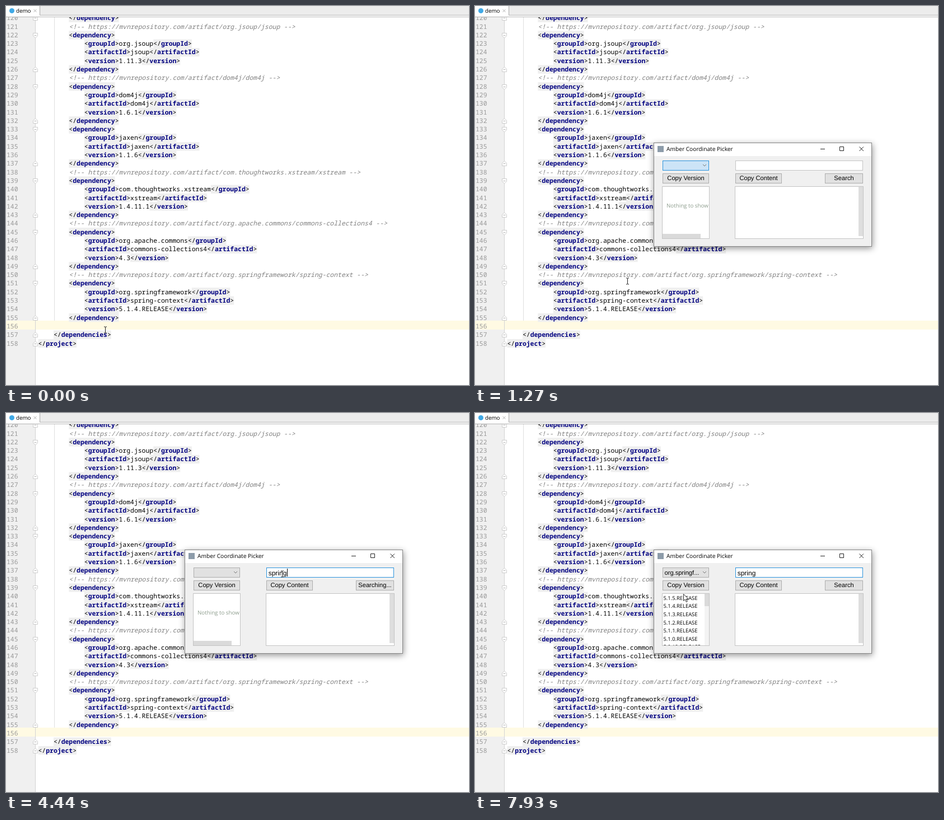
Animation, 827 px wide and 677 px high, one loop 8000 ms. Source, as an HTML page:

```html
<!DOCTYPE html>
<html lang="en">
<head>
<meta charset="utf-8">
<title>Dependency picker</title>
<style>
  html, body { margin: 0; width: 100%; height: 100%; overflow: hidden; background: #fff; }
  svg { display: block; width: 827px; height: 677px; }
  text { text-rendering: geometricPrecision; }
  .mono { font: 11.43px "Noto Sans Mono", "DejaVu Sans Mono", monospace; }
  .tag { font-weight: 700; fill: #000080; }
  .note { font-style: italic; fill: #808080; }
  .num { fill: #999; }
  .ui { font-family: "Open Sans", "Noto Sans", sans-serif; }
  .swing { font: 11.15px "Liberation Sans", Arial, sans-serif; }
  .shadow { filter: drop-shadow(1px 3px 6px rgba(0, 0, 0, .42)); }
  .line { fill: none; stroke: #222; }
</style>
</head>
<body>
<svg id="stage" viewBox="0 0 827 677"></svg>
<script>
const LOOP = 8000, TICK = 77;
const CHAR = 6.857, LEFT = 57.5, ROW = 15.295;

const esc = s => s.replace(/&/g, '&amp;').replace(/</g, '&lt;');
const text = (x, y, s, cls = '', more = '') => `<text x="${x}" y="${y}" class="${cls}" ${more}>${esc(s)}</text>`;
const rect = (x, y, w, h, fill, more = '') => `<rect x="${x}" y="${y}" width="${w}" height="${h}" fill="${fill}" ${more}/>`;
const box = (x, y, w, h, fill, stroke, id = '') =>
  rect(x + .5, y + .5, w - 1, h - 1, fill, `stroke="${stroke}" ${id && `id="${id}"`}`);
const path = (d, cls = 'line', more = '') => `<path d="${d}" class="${cls}" ${more}/>`;

// Editor
const repo = 'https://mvnrepository.com/artifact/';
const deps = [
  ['org.jsoup', 'jsoup', '1.11.3', true],
  ['dom4j', 'dom4j', '1.6.1', true],
  ['jaxen', 'jaxen', '1.1.6', false],
  ['com.thoughtworks.xstream', 'xstream', '1.4.11.1', true],
  ['org.apache.commons', 'commons-collections4', '4.3', true],
  ['org.springframework', 'spring-context', '5.1.4.RELEASE', true]
];

function sourceLines() {
  const lines = [[8, '</dependency>']];
  const leaf = (name, value) => lines.push([12, `<${name}>${value}</${name}>`]);
  for (const [group, artifact, version, noted] of deps) {
    if (noted) lines.push([8, `<!-- ${repo}${group}/${artifact} -->`]);
    lines.push([8, '<dependency>']);
    leaf('groupId', group);
    leaf('artifactId', artifact);
    leaf('version', version);
    lines.push([8, '</dependency>']);
  }
  return lines.concat([[0, ''], [4, '</dependencies>'], [0, '</project>']]);
}

function fold(y, closing) {
  const s = closing ? -1 : 1;
  const d = `M48.5 ${y - 4 * s}h8v${5 * s}l-4 ${3.5 * s}l-4 ${-3.5 * s}z`;
  return path(d, '', 'fill="#fff" stroke="#cdcdcd"') +
    path(`M50.5 ${y}h4`, '', 'stroke="#b4b4b4"');
}

function codeLine([indent, code], i) {
  const mid = 36.6 + (i - 1) * ROW, base = Math.round(mid + 4);
  let out = text(1, base, String(120 + i), 'mono num');
  if (code.startsWith('<!--'))
    return out + text(LEFT + indent * CHAR, base, code, 'mono note');
  let col = indent;
  for (const part of code.match(/<[^>]+>|[^<]+/g) || []) {
    const at = n => LEFT + n * CHAR;
    if (part[0] === '<') {
      const head = part[1] === '/' ? 2 : 1;
      out += rect(at(col), mid - 7.6, part.length * CHAR, ROW, '#efefef') +
        text(at(col), base, part.slice(0, head), 'mono') +
        text(at(col + head), base, part.slice(head, -1), 'mono tag') +
        text(at(col + part.length - 1), base, '>', 'mono');
    } else out += text(at(col), base, part, 'mono');
    col += part.length;
  }
  if (/^<\/?[a-z]+>$/.test(code)) out += fold(Math.round(mid) + .5, code[1] === '/');
  return out;
}

const editor = rect(0, 0, 827, 677, '#fff') +
  rect(0, 20, 52, 657, '#f0f0f0') +
  rect(0, 562, 827, 16, '#fffae3') +
  rect(52, 20, 1, 657, '#d4d4d4') +
  rect(86, 20, 1, 542, '#dedede') +
  sourceLines().map(codeLine).join('') +
  rect(113, 563, 1, 15, '#000', 'id="editCaret"') +
  rect(0, 0, 827, 20, '#fff') +
  rect(60, 0, 767, 17, '#ececec') +
  rect(60, 0, 1, 17, '#a8a8a8') + rect(60, 16, 767, 1, '#b4b4b4') +
  rect(0, 19, 827, 1, '#b4b4b4') +
  '<circle cx="10.5" cy="8.5" r="4.5" fill="#40a9e6"/>' +
  text(18, 12, 'demo', 'ui', 'font-size="9.8"') +
  path('M49.5 6l5 5m0-5l-5 5', '', 'stroke="#b0b0b0"');

// Dialog
const button = (x, w, label, id = '') => box(x, 299, w, 18, '#e1e1e1', '#adadad') +
  text(x + w / 2, 311, label, 'swing', `text-anchor="middle" ${id && `id="${id}"`}`);

const versions = ['5.1.5', '5.1.4', '5.1.3', '5.1.2', '5.1.1', '5.1.0', '5.0.13'];

const dialog = rect(319, 244, 390, 186, '#f0f0f0', 'class="shadow"') +
  box(319, 244, 390, 186, '#f0f0f0', '#858585') +
  rect(320, 245, 388, 23, '#fff') +
  rect(326, 250, 11, 11, '#8d9caa') +
  text(342, 259, 'Amber Coordinate Picker', 'ui', 'font-size="10.2"') +
  path('M617 255.5h8M651.5 251.5h7v7h-7zM686.5 251.5l7.5 7.5m0-7.5l-7.5 7.5') +
  box(335, 276, 83, 18, '#e1e1e1', '#adadad', 'combo') +
  path('M407 283l3 3l3-3', 'line', 'style="stroke:#777"') +
  text(338.5, 289, 'org.springf...', 'swing', 'id="group"') +
  box(465, 276, 228, 18, '#fff', '#c4c4c4', 'field') +
  text(468.7, 290, '', 'swing', 'id="typed" style="font-size:12px"') +
  rect(469, 278, 1, 14, '#000', 'id="caret"') +
  button(335, 83, 'Copy Version', 'copy') +
  button(465, 83, 'Copy Content') +
  button(625, 68, 'Search', 'search') +
  box(334, 322, 85, 94, '#fff', '#c4c4c4') +
  '<g id="empty">' + text(342, 360, 'Nothing to show', 'ui', 'font-size="9.75" fill="#8c9c8c"') +
  rect(335, 407, 68, 8, '#dadada') + '</g>' +
  '<clipPath id="clip"><rect x="335" y="323" width="83" height="92"/></clipPath>' +
  '<g id="list" clip-path="url(#clip)">' + rect(410, 323, 8, 92, '#f3f3f3') + rect(410, 323, 8, 22, '#dadada') +
  versions.map((v, i) => text(336.5, Math.round(333.7 + i * 14.6), v + '.RELEASE', 'ui', 'font-size="9.4"')).join('') + '</g>' +
  box(464, 322, 230, 94, '#fff', '#c4c4c4') +
  rect(685, 323, 8, 88, '#dedede');

const pointers =
  path('M-2.5-5.5h2l.5 .5l.5-.5h2M0-5v10M-2.5 5.5h2l.5-.5l.5 .5h2', 'line', 'id="beam"') +
  path('M0 0v12l2.8-2.6l2 4.8l2-.9l-2-4.6h3.8z', '', 'id="arrow" fill="#fff" stroke="#222" stroke-width=".9"');

const stage = document.getElementById('stage');
stage.innerHTML = editor + `<g id="dialog">${dialog}</g>` + pointers;
const el = id => document.getElementById(id);
const show = (id, on) => el(id).setAttribute('visibility', on ? 'inherit' : 'hidden');
const set = (id, attrs) => { for (const k in attrs) el(id).setAttribute(k, attrs[k]); };

// Tables of steps: [start, value, ...]
const opening = [[0, 0, .92], [500, .3, .96], [570, .75, .985], [650, .93, .995], [730, 1, 1]];
const typing = [[0, '', 469], [2890, 's', 475], [2980, 'sp', 482], [3120, 'spr', 486],
  [3200, 'spri', 489], [3350, 'sprin', 496], [3430, 'spring', 502]];
const blinks = [1880, 2340, 2890, 3890, 4440, 4910, 5460, 5920, 6150, 6530, 7000, 7470];
const moves = [
  [1040, 11, 494, 287],
  [6380, 3, 517, 288],
  [6700, 5, 530, 288],
  [7470, 7, 373, 323]
];

const latest = (table, t) => table.filter(row => row[0] <= t).pop();

const easeBoth = p => p * p * (3 - 2 * p);
const easeOut = p => 1 - (1 - p) ** 2;

function pointer(t) {
  let x = 178, y = 578;
  for (const [start, steps, toX, toY] of moves) {
    if (t < start) break;
    const p = Math.min(1, (Math.floor((t - start) / TICK + .06) + 1) / steps);
    const e = (toX < x ? easeOut : easeBoth)(p);
    x += (toX - x) * e;
    y += (toY - y) * e;
  }
  return [x, y];
}

function draw(t) {
  const [, alpha, size] = latest(opening, t);
  set('dialog', {
    opacity: alpha,
    transform: `translate(514 337) scale(${size}) translate(-514 -337)`
  });
  show('editCaret', t >= 420 && t < 500);

  const focus = t >= 1880, found = t >= 6150;
  set('combo', { fill: focus ? '#e1e1e1' : '#cce4f7', stroke: focus ? '#adadad' : '#2b93dc' });
  set('field', { stroke: focus ? '#2b93dc' : '#c4c4c4' });

  const [, word, caretX] = latest(typing, t);
  el('typed').textContent = word;
  set('caret', { x: caretX });
  show('caret', blinks.filter(b => b <= t).length % 2 === 1);

  el('search').textContent = t >= 4270 && !found ? 'Searching...' : 'Search';
  el('copy').textContent = found && t < 7320 ? 'Searching...' : 'Copy Version';
  show('group', found);
  show('list', found);
  show('empty', !found);

  const [x, y] = pointer(t);
  const inside = t >= 730 && x > 319 && x < 709 && y > 244 && y < 430;
  const inField = x > 465 && x < 693 && y > 276 && y < 294;
  const arrow = inside && !inField;
  show('beam', !arrow);
  show('arrow', arrow);
  set(arrow ? 'arrow' : 'beam', { transform: `translate(${Math.round(x) - .5} ${Math.round(y) + .5})` });
}

const began = performance.now();
function frame() {
  draw((performance.now() - began) % LOOP);
  requestAnimationFrame(frame);
}
frame();
</script>
</body>
</html>
```
